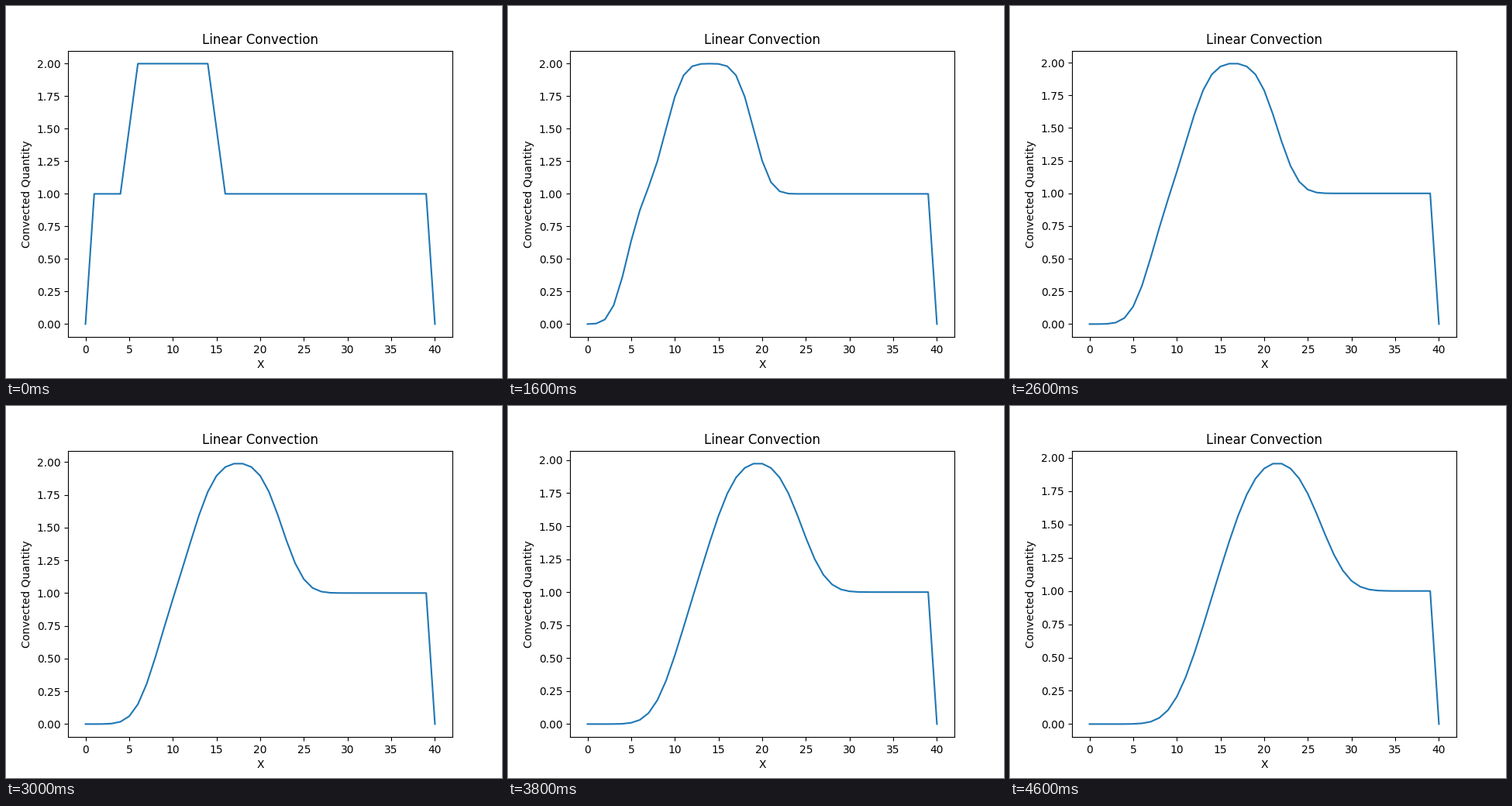
A matplotlib script that plays this animation: 640x480 px, repeating every 4.8 s.

```python
import matplotlib.pyplot as plt
import numpy as np
from matplotlib.animation import FuncAnimation

FRAMES = 24
INTERVAL = 200
COURANT = 0.5


def initial_state():
    u = np.ones(41)
    u[6:15] = 2
    u[[5, 15]] = 1.5
    u[[0, -1]] = 0
    return u


def convect(u):
    """One upwind step; both end values stay fixed."""
    new = u.copy()
    new[1:-1] -= COURANT * (u[1:-1] - u[:-2])
    return new


states = [initial_state()]
while len(states) < FRAMES:
    states.append(convect(states[-1]))

fig, ax = plt.subplots(figsize=(6.4, 4.8), dpi=100)
line, = ax.plot(states[0])
ax.set_title("Linear Convection")
ax.set_xlabel("X")
ax.set_ylabel("Convected Quantity")


def update(i):
    line.set_ydata(states[i])
    ax.relim()
    ax.autoscale_view()
    return line,


anim = FuncAnimation(fig, update, frames=FRAMES, init_func=lambda: update(0),
                     interval=INTERVAL, repeat=True, repeat_delay=0)
plt.show()
```
